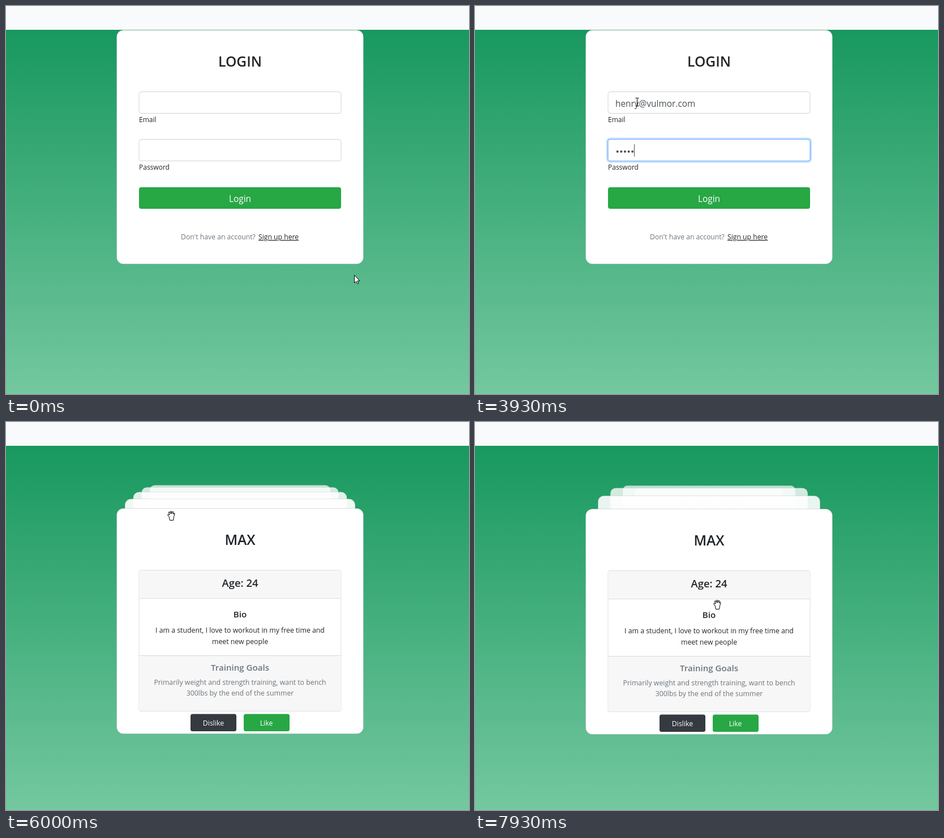
Animation of 818 by 685 pixels, one loop 8 s. Source, as an HTML page:

```html
<!DOCTYPE html>
<html lang="en">
<head>
<meta charset="utf-8">
<title>Login</title>
<style>
html, body { margin: 0; width: 100%; height: 100%; overflow: hidden; }
body { background: linear-gradient(#f9fafc 42px, #18985f 42px, #74c89f 685px); }
svg { position: absolute; left: 0; top: 0; width: 818px; height: 685px; overflow: hidden; }
text { font-family: "Open Sans", "Noto Sans", sans-serif; white-space: pre; }
.head { font-weight: 600; }
.mid { text-anchor: middle; }
#dialog { transform-origin: 413.5px 0; overflow: visible; }
</style>
</head>
<body>
<svg id="page"></svg>
<svg id="dialog"></svg>
<svg id="pointer"></svg>
<script>
const TICK = 1000 / 15, TICKS = 120;
const INK = '#212529', GRAY = '#6c757d', GREEN = '#28a745', FIELD = '#495057';
const EMAIL = 'henry@vulmor.com';
const EMAIL_KEYS = [16, 17, 18, 20, 21, 25, 31, 33, 36, 37, 38, 40, 41, 43, 44, 46];
const PASS_KEYS = [53, 54, 55, 56, 59, 60, 61, 65, 66, 68, 74];
const $ = id => document.getElementById(id);

// Markup helpers
const text = (x, y, size, str, fill = INK, cls = 'mid', more = '') =>
  `<text x="${x}" y="${y}" font-size="${size}" fill="${fill}" class="${cls}" ${more}>${str}</text>`;
const box = (x, y, w, h, r, fill, more = '') =>
  `<rect x="${x}" y="${y}" width="${w}" height="${h}" rx="${r}" fill="${fill}" ${more}/>`;
const EDGE = 'stroke="#000" stroke-opacity=".125"';

// Motion helpers
const ramp = (k, a, b) => Math.min(1, Math.max(0, (k - a) / (b - a)));
const typed = (keys, k) => keys.filter(t => t <= k).length;
function track(keys, k) {
  let i = 0;
  while (i < keys.length - 2 && keys[i + 1][0] <= k) i++;
  const [a, b] = [keys[i], keys[i + 1]], u = ramp(k, a[0], b[0]);
  return a.slice(1).map((v, j) => v + (b[j + 1] - v) * u);
}

const field = (id, y) =>
  box(235, y, 357, 38, 4, '#fff', 'stroke="#ced4da"') +
  `<g id="${id}">` + box(235, y, 357, 38, 4, 'none', 'stroke="#80bdff"') +
  box(233.5, y - 1.5, 360, 41, 5, 'none', 'stroke="#007bff" stroke-opacity=".25" stroke-width="3"') + '</g>';

const login = '<g id="login">' +
  box(195.5, 42.5, 436, 413, 12, '#fff', EDGE) +
  text(413.5, 107, 24.6, 'LOGIN', INK, 'mid head') +
  field('emailFocus', 151.5) + field('passFocus', 235.5) +
  text(248, 178, 15.4, '', FIELD, '', 'id="email"') + '<g id="dots"></g>' +
  box(0, 0, 1, 22, 0, FIELD, 'id="caret"') +
  text(235, 204.5, 12, 'Email', INK, '') +
  text(235, 288.5, 12, 'Password', INK, '') +
  box(235, 320, 357, 38, 4, GREEN) +
  text(413.5, 345.5, 15.4, 'Login', '#fff') +
  text(309, 412, 12.2, 'Don\'t have an account?', GRAY, '') +
  text(446, 412, 12.2, 'Sign up here', INK, '', 'text-decoration="underline"') + '</g>';

// Cards are drawn from their own top edge, centred on x = 0
const CARD_H = 398;
const profile = box(-178.5, 109.5, 357, 249, 3, '#fff', EDGE) +
  box(-178, 110, 356, 49, 2, '#f7f7f7') + box(-178, 260, 356, 98, 2, '#f7f7f7') +
  '<path d="M-178 159.5H178M-178 260.5H178" stroke="#000" stroke-opacity=".125"/>' +
  text(0, 139, 18.4, 'Age: 24', INK, 'mid head') +
  text(0, 192.5, 15.1, 'Bio', INK, 'mid head') +
  text(0, 220, 12.3, 'I am a student, I love to workout in my free time and') +
  text(0, 239.5, 12.3, 'meet new people') +
  text(0, 287, 15.1, 'Training Goals', GRAY, 'mid head') +
  text(0, 311.5, 12.3, 'Primarily weight and strength training, want to bench', GRAY) +
  text(0, 331, 12.3, '300lbs by the end of the summer', GRAY) +
  box(-87.5, 363.5, 81, 30.5, 3.5, '#343a40') + box(6.5, 363.5, 81, 30.5, 3.5, GREEN) +
  text(-47, 383.5, 12.3, 'Dislike', '#fff', 'mid', 'font-weight="500"') +
  text(46.5, 383.5, 12.3, 'Like', '#fff', 'mid', 'font-weight="500"');
const TITLES = ['MAX', '', '', 'CONSTANTINE', ''];
const card = i => `<g id="card${i}">` + box(-218, 0.5, 436, CARD_H, 12, '#fff', EDGE) +
  text(0, 65, 24.6, TITLES[i], INK, 'mid head') + (i ? '' : profile) + '</g>';

$('page').innerHTML = login +
  '<g id="deck">' + [4, 3, 2, 1, 0].map(card).join('') + '</g>';

$('dialog').innerHTML =
  box(232, -150, 363, 348, 4, '#28292c', 'style="filter:drop-shadow(0 2px 3px #0008)"') +
  '<g fill="none" stroke="#5f6368" stroke-opacity=".7">' +
  '<path d="M232 25c22-14 30 20 50 14c14-5 16-5 24 0" stroke-width="5"/>' +
  '<path d="M323 0V52q0 3 3 3H375q3 0 3-3V44M378 42H434q5 0 5-5V0M446 0V41" stroke-width="1.5" stroke-opacity=".4"/>' +
  '<path d="M275 2v16M268 6l14 8M282 6l-14 8" stroke-width="3"/></g>' +
  '<path d="M562 22a8 7 0 0 1 16 0z" fill="#5f6368"/>' +
  '<path id="alert" d="M351 1l19 32h-38z" stroke-width="2" stroke-linejoin="round"/>' +
  '<path d="M351 14v9M351 26v3" stroke="#28292c" stroke-width="2.5"/>' +
  '<path d="M375 17v9M371 19l8 5M379 19l-8 5M387 17v9M383 19l8 5M391 19l-8 5M399 17v9M395 19l8 5M403 19l-8 5M408 16v11" stroke="#8ab4f8" stroke-width="1.8"/>' +
  text(244, 90, 11.9, 'Change your password', '#e8eaed', '') +
  text(244, 119, 9.3, 'The password you just used was found in a data breach. Norvik Password', '#9aa0a6', '') +
  text(244, 135.5, 9.3, 'Manager recommends changing your password now.', '#9aa0a6', '') +
  '<circle cx="253" cy="174" r="5.5" fill="none" stroke="#bdc1c6" stroke-width="1.3"/>' +
  '<path d="M253 171v1.4M253 173.5v4" stroke="#bdc1c6" stroke-width="1.3"/>' +
  box(531.5, 159.5, 52, 27, 3, '#8ab4f8') +
  box(530.5, 158.5, 54, 29, 4, 'none', 'id="okRing" stroke="#c3dafb" stroke-width="2"') +
  text(557.5, 176.5, 9.5, 'OK', '#28292c');

const SHAPES = {
  arrow: '<path d="M0 0V14l3.2-3 2.4 4.5 2-1-2.3-4.3h4.2z" fill="#fff" stroke="#000"/>',
  beam: '<path d="M-3-7H-.5L0-6.5.5-7H3M0-6.5V6.5M-3 7H-.5L0 6.5.5 7H3" fill="none" stroke="#000"/>',
  hand: '<path d="M-4 1l-2-2q-1-2 1-2l2 1-1.5-4q0-2 1.5-1l2 3-.5-4q1-2 2 0l.5 4 1-3.5q1.5-1 2 .5l-.5 4 1.5-2q1.5 0 1 1.5l-1.5 5-1 6h-6z" fill="#fff" stroke="#000" stroke-linejoin="round"/>'
};
const shapeAt = k => k < 2 ? 'arrow' : k < 83 ? 'beam' : k < 88 ? 'arrow' : 'hand';

// [tick, x, y]
const PATH = [
  [0, 615.5, 475], [1, 440, 320], [2, 280.5, 188], [3, 280.5, 188], [5, 286.5, 169.5],
  [82, 286.5, 169.5], [83, 285.5, 168.5], [87, 285.5, 168.5], [88, 292, 166], [91, 292, 166],
  [94, 442, 246], [100, 500, 200], [104, 544, 169], [108, 544, 169], [112, 425, 332],
  [114, 416, 344], [116, 379, 340], [119, 428, 323]
];
// [tick, opacity, tilt]
const POPUP = [[93, 0, 1.6], [94, .41, 1], [97, 1, 0], [107, 1, 0], [108, .88, .5], [111, 0, 1.5]];

function drawLogin(k) {
  $('login').style.display = k < 86 ? '' : 'none';
  const toPass = ramp(k, 46, 49);
  $('emailFocus').style.opacity = ramp(k, 6, 9) - toPass;
  $('passFocus').style.opacity = toPass;

  const email = $('email'), n = typed(PASS_KEYS, k);
  email.textContent = EMAIL.slice(0, typed(EMAIL_KEYS, k));
  $('dots').innerHTML = PASS_KEYS.slice(0, n).map((_, i) =>
    `<circle cx="${251.7 + 6.63 * i}" cy="257" r="2.1" fill="${FIELD}"/>`).join('');

  const inPass = k >= 47, caret = $('caret');
  const x = inPass ? 248 + 6.6 * n : 248 + email.getComputedTextLength();
  caret.setAttribute('x', Math.round(x));
  caret.setAttribute('y', inPass ? 244 : 160);
  caret.style.opacity = k >= 7 && k !== 15 && k < 82 ? 1 : 0;
}

function drawDeck(k) {
  $('deck').style.display = k >= 88 ? '' : 'none';
  const p = 1 - (1 - ramp(k, 88, 92.7)) ** 2, mid = CARD_H / 2;
  for (let i = 0; i < 5; i++) {
    const s = 1 - .1 * i * p, g = $('card' + i);
    g.setAttribute('transform',
      `translate(413.5 ${150 + 3 * p + mid}) scale(${s}) translate(0 ${-48 * i * p - mid})`);
    g.style.opacity = s;
  }
}

function drawDialog(k) {
  const [alpha, tilt] = track(POPUP, k), d = $('dialog');
  d.style.display = alpha > 0 ? '' : 'none';
  d.style.opacity = alpha;
  d.style.transform = `perspective(1000px) translateY(${-9 * tilt}px) rotateX(${6.3 * tilt}deg)`;
  const tint = k < 100 ? '#f3d9a6' : '#e49b90';
  $('alert').setAttribute('fill', tint);
  $('alert').setAttribute('stroke', tint);
  $('okRing').style.display = k < 107 ? '' : 'none';
}

function drawPointer(k) {
  const [x, y] = track(PATH, k);
  $('pointer').innerHTML = `<g transform="translate(${x} ${y})">${SHAPES[shapeAt(k)]}</g>`;
}

let last = -1;
function frame() {
  const k = Math.floor((performance.now() % 8000 + 3.4) / TICK) % TICKS;
  if (k !== last) {
    last = k;
    [drawLogin, drawDeck, drawDialog, drawPointer].forEach(draw => draw(k));
  }
  requestAnimationFrame(frame);
}
frame();
</script>
</body>
</html>
```
